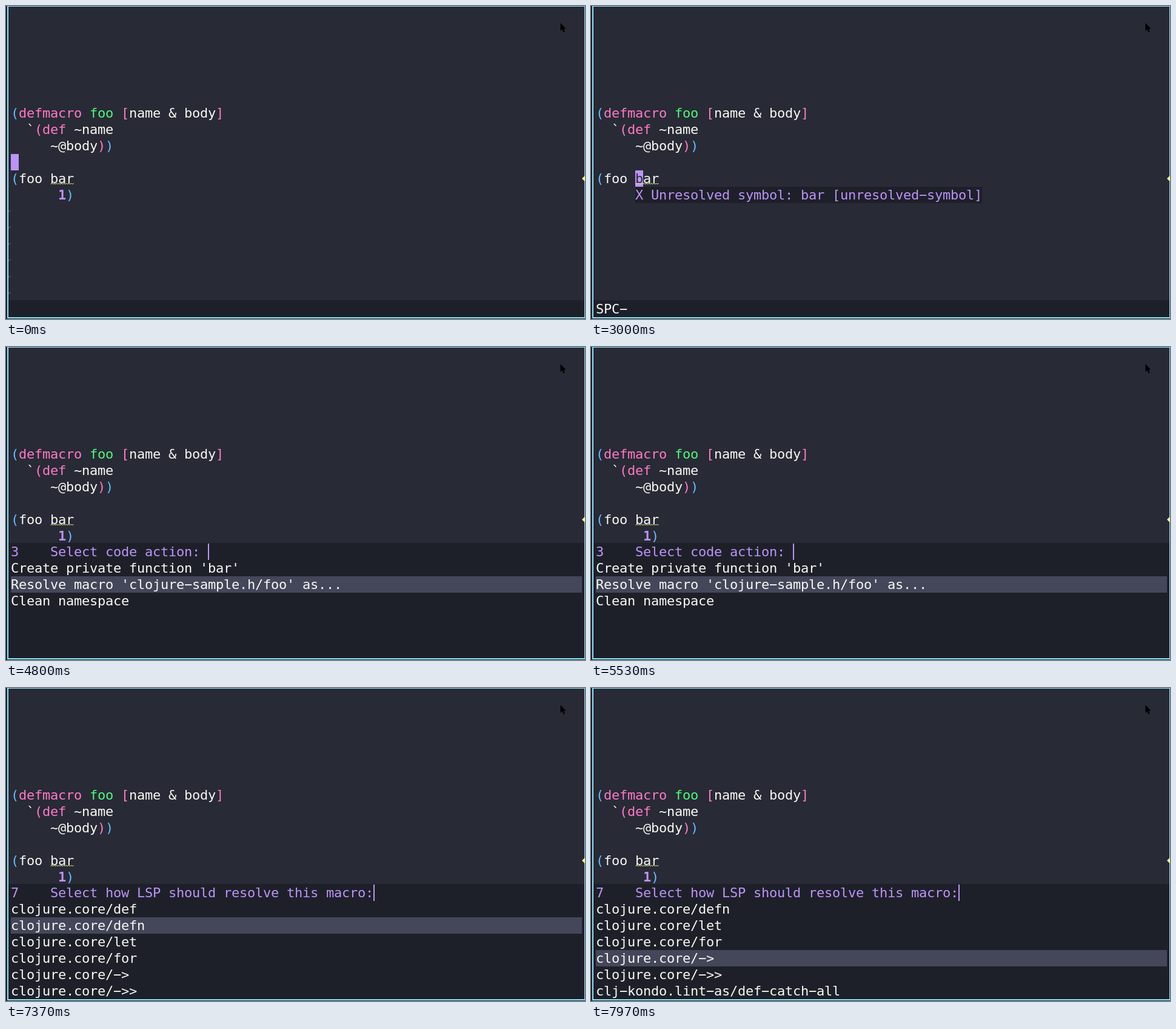
These frames come from a looping animation (955 by 516 pixels, 8000 ms). An HTML page with a canvas:

```html
<!DOCTYPE html>
<html lang="en">
<head>
<meta charset="utf-8">
<title>Code action in an editor</title>
<style>
html, body { margin: 0; width: 100%; height: 100%; overflow: hidden; background: #1e2029; }
canvas { display: block; width: 955px; height: 516px; }
</style>
</head>
<body>
<canvas id="stage" width="955" height="516"></canvas>
<script>
const ctx = document.getElementById('stage').getContext('2d');
const LOOP = 8000, COL = 13, ROW = 27, LEFT = 8, ASCENT = 21;
const FONT = '22px "DejaVu Sans Mono", monospace';
const C = {
  bg: '#282a36', dark: '#1e2029', select: '#44475a', border: '#8be9fd',
  white: '#f8f8f2', purple: '#bd93f9', pink: '#ff79c6', green: '#50fa7b',
  blue: '#61bfff', yellow: '#f1fa8c', red: '#ff5555', mark: '#0189cc', tilde: '#5c5f6c'
};

// Code rows: top, then runs of [column, text, colour, bold]
const CODE = [
  [163, [0, '(', C.blue], [1, 'defmacro', C.pink], [10, 'foo', C.green], [14, '[', C.pink],
    [15, 'name & body', C.white], [26, ']', C.pink]],
  [190, [2, '`', C.white], [3, '(def', C.pink], [8, '~name', C.white]],
  [217, [5, '~@body', C.white], [11, ')', C.pink], [12, ')', C.blue]],
  [271, [0, '(', C.blue], [1, 'foo bar', C.white]],
  [298, [6, '1', C.purple, true], [7, ')', C.blue]]
];
const CALL = 271, ARG = 298, PROMPT = 324, ECHO = 486;

const ACTIONS = ["Create private function 'bar'", "Resolve macro 'clojure-sample.h/foo' as...", 'Clean namespace'];
const MACROS = ['def', 'defn', 'let', 'for', '->', '->>'].map(s => 'clojure.core/' + s)
  .concat('clj-kondo.lint-as/def-catch-all');

// Latest value of a [time, value] list
const at = (steps, t) => steps.reduce((v, s) => t >= s[0] ? s[1] : v, null);
const CURSOR = [[0, -1], [530, 0], [1070, 1], [1130, 2], [1470, 3], [1630, 4], [1770, 5], [3930, null]];
const MESSAGE = [[0, ''], [2270, 'bar'], [3000, 'SPC-'], [3330, 'SPC c-'], [3800, '']];
const PICK = [[3930, 0], [4800, 1], [5230, 0], [5530, 1], [6630, 0], [7370, 1], [7630, 2], [7800, 3], [7970, 4]];

const x = col => LEFT + col * COL;

function rect(left, top, w, h, color) {
  ctx.fillStyle = color;
  ctx.fillRect(left, top, w, h);
}

function text(col, top, str, color, bold) {
  ctx.font = (bold ? 'bold ' : '') + FONT;
  ctx.fillStyle = color;
  // the wide minus gives the long hyphen of the editor font
  [...str.replace(/-/g, '\u2212')].forEach((ch, i) => ctx.fillText(ch, x(col + i), top + ASCENT));
}

function shape(points, color) {
  ctx.fillStyle = color;
  ctx.beginPath();
  points.forEach(p => ctx.lineTo(...p));
  ctx.fill();
}

function wave() {
  ctx.strokeStyle = C.yellow;
  ctx.lineWidth = 1;
  ctx.beginPath();
  for (let i = 0; i <= 19; i++) ctx.lineTo(73.5 + i * 2, i % 2 ? 292 : 294);
  ctx.stroke();
}

function frame() {
  rect(0, 0, 955, 516, C.dark);
  rect(2, 0, 953, 515, C.border);
  rect(4, 1, 950, 512, C.bg);
}

function code(t) {
  const popup = t >= 2000 && t < 3800;
  for (const [top, ...runs] of CODE) {
    if (top === ARG && popup) continue;
    runs.forEach(r => text(r[0], top, ...r.slice(1)));
  }
  if (t >= 630 && t < 1070) {
    rect(x(7), ARG, COL, ROW, C.dark);
    text(7, ARG, ')', C.red, true);
  }
  const marked = t >= 2270 && t < 2530;
  if (marked) {
    rect(x(5), CALL, 3 * COL, ROW, C.mark);
    text(5, CALL, 'bar', C.white, true);
  }
  const col = at(CURSOR, t);
  if (col === -1) rect(LEFT, 244, COL, ROW, C.purple);
  else if (col !== null) {
    rect(x(col), CALL, COL, ROW, C.purple);
    text(col, CALL, '(foo bar'[col], C.bg, marked);
  }
  wave();
  if (popup) {
    rect(x(5), ARG, 44 * COL, ROW, C.dark);
    text(5, ARG, 'X Unresolved symbol: bar [unresolved-symbol]', C.purple);
  }
}

function tildes() {
  for (let y = 337; y < 480; y += ROW) {
    rect(5, y, 3, 1, C.tilde);
    rect(4, y + 1, 1, 2, C.tilde);
  }
}

function menu(prompt, items, pick, count) {
  const first = Math.max(0, pick - 3);
  rect(4, PROMPT - 1, 950, 513 - PROMPT + 1, C.dark);
  text(0, PROMPT, String(count), C.purple);
  text(5, PROMPT, prompt, C.purple);
  rect(x(5 + prompt.length), PROMPT, 2, ROW, C.purple);
  rect(LEFT, PROMPT + ROW * (pick - first + 1), 942, ROW, C.select);
  items.slice(first, first + 6).forEach((s, i) => text(0, PROMPT + ROW * (i + 1), s, C.white));
}

function draw(t) {
  frame();
  if (t < 2000) tildes();
  code(t);
  const pick = at(PICK, t);
  if (pick === null) {
    rect(4, ECHO - 1, 950, 28, C.dark);
    text(0, ECHO, at(MESSAGE, t), C.white);
  } else if (t < 6630) {
    menu('Select code action: ', ACTIONS, pick, 3);
  } else {
    menu('Select how LSP should resolve this macro:', MACROS, pick, 7);
  }
  shape([[950, 284.5], [955, 279.5], [955, 289.5]], C.yellow);
  shape([[914.5, 28], [914.5, 41], [917.5, 38.5], [919.7, 43.5], [921.8, 42.5], [919.7, 37.8], [923.5, 37.5]], '#000');
}

const start = performance.now();
function tick() {
  draw((performance.now() - start) % LOOP);
  requestAnimationFrame(tick);
}
tick();
</script>
</body>
</html>
```
